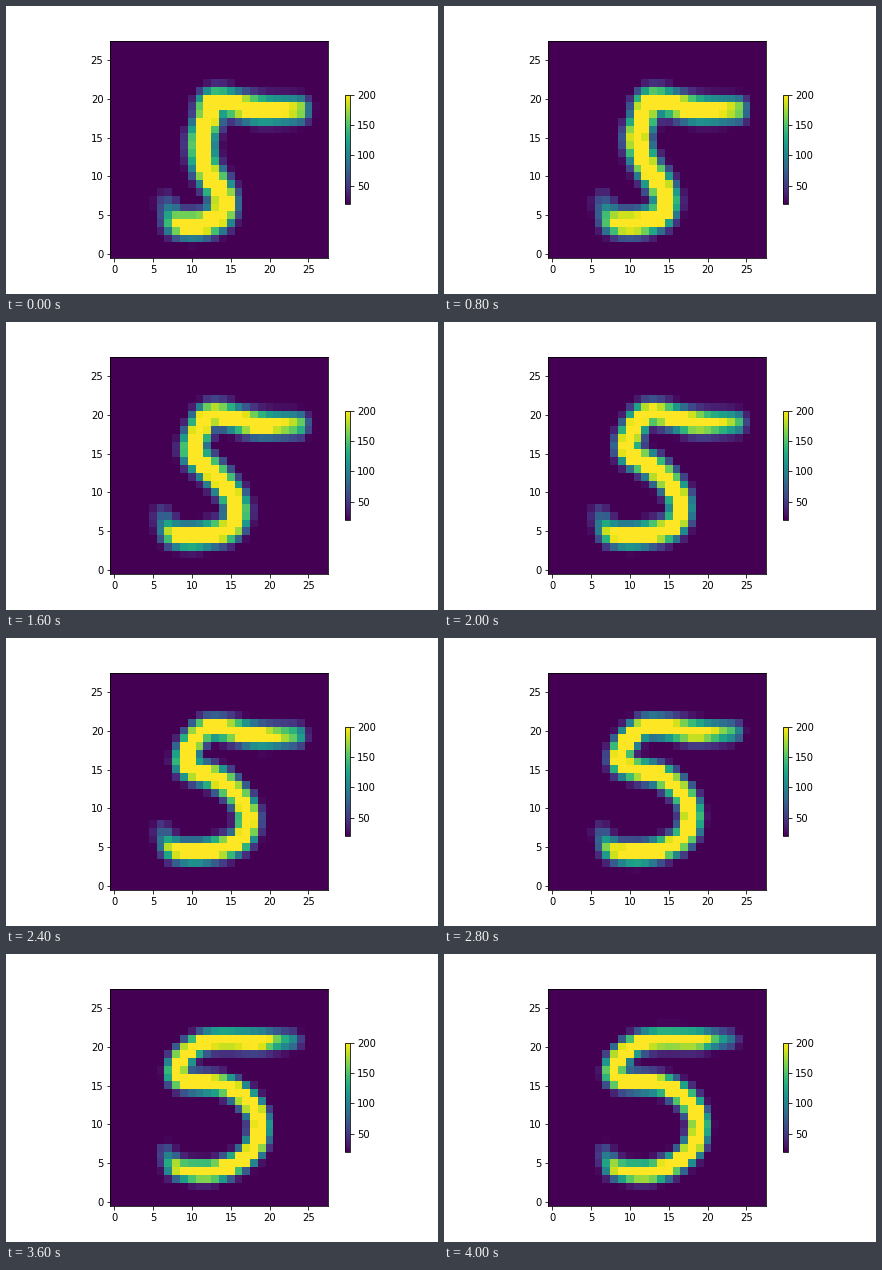
Recreate the animation shown at these times as a matplotlib script. Size 432 by 288 pixels, loop 4200 ms.

```python
import numpy as np
import matplotlib.pyplot as plt
from matplotlib.animation import FuncAnimation

FRAMES, INTERVAL, SIZE = 21, 200, 28
PEAK = 265

# The pen stroke from the tip of the top bar to the tail, as narrow and wide poses.
NARROW = np.array([(23.5, 18.55), (18.5, 18.6), (13, 19.6), (12.1, 17.4),
                   (11.3, 14.6), (11.7, 11.3), (12.9, 9.3), (14.1, 7),
                   (13.6, 5), (11.5, 3.9), (9.3, 3.8), (8, 4.2), (6.7, 6.6)])
WIDE = np.array([(22.8, 20.9), (18.5, 20.85), (12.2, 20.7), (8.9, 18.8),
                 (8.4, 15.9), (14.5, 15), (17.9, 12.5), (18.9, 9.5),
                 (17.5, 6.3), (14, 4.2), (10.7, 3.9), (8, 4.5), (6.7, 6.6)])
BAR, FOOT = slice(0, 2), slice(-4, None)
rows, cols = np.mgrid[:SIZE, :SIZE]


def smoothstep(t):
    return t * t * (3 - 2 * t)


def pose(t):
    ease = smoothstep(t)
    blend = np.full((len(NARROW), 1), ease)
    blend[BAR] = ease ** 2.5  # the top bar rises late
    points = NARROW + blend * (WIDE - NARROW)
    # the foot swings up and left, then returns
    points[FOOT] += np.array([-0.6, 0.6]) * np.sin(np.pi * t) ** 2
    return points


def smooth_path(points, steps=16):
    """Catmull-Rom curve through the points."""
    padded = np.vstack([2 * points[0] - points[1], points,
                        2 * points[-1] - points[-2]])
    a, b, c, d = (padded[k:len(padded) - 3 + k, None] for k in range(4))
    u = np.arange(steps)[:, None] / steps
    curve = b + 0.5 * u * (c - a + u * (2 * a - 5 * b + 4 * c - d
                                        + u * (3 * (b - c) + d - a)))
    return np.vstack([curve.reshape(-1, 2), points[-1]])


def digit(frame):
    t = frame / (FRAMES - 1)
    points = pose(t)
    path = smooth_path(points)
    strength = np.ones(len(points))
    strength[0] = 0.75 - 0.4 * t * t
    strength[-2:] = 0.75, 0.25
    position = np.linspace(0, len(points) - 1, len(path))
    ink = PEAK * np.exp(np.interp(position, np.arange(len(points)), np.log(strength)))
    width = 1.75 - 0.4 * smoothstep(t)
    dist2 = (cols[..., None] - path[:, 0]) ** 2 + (rows[..., None] - path[:, 1]) ** 2
    return (ink * np.exp(-dist2 / width ** 2)).max(axis=-1)


plt.rcParams.update({"font.family": "DejaVu Sans", "font.size": 10})
fig, ax = plt.subplots(figsize=(6, 4), dpi=72)
fig.subplots_adjust(left=0.125, right=0.9, bottom=0.125, top=0.88)
image = ax.imshow(digit(0), origin="lower", cmap="viridis",
                  vmin=20, vmax=200, interpolation="nearest")
fig.colorbar(image, ax=ax, shrink=0.5, ticks=range(50, 201, 50))
ax.set_xticks(range(0, SIZE, 5))
ax.set_yticks(range(0, SIZE, 5))


def update(frame):
    image.set_data(digit(frame))
    return [image]


anim = FuncAnimation(fig, update, frames=FRAMES, interval=INTERVAL,
                     repeat=True, repeat_delay=0)
plt.show()
```
